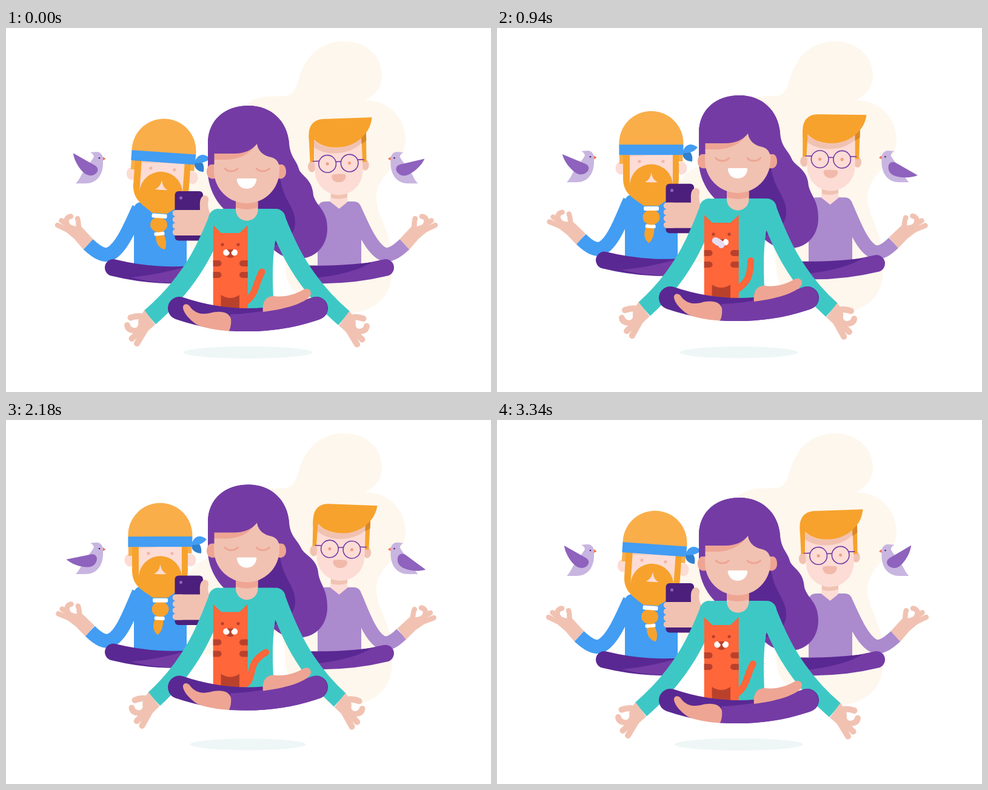
An HTML page for the animation above (3.36 s loop, 800 by 600 pixels).

```html
<!DOCTYPE html>
<html lang="en">
<head>
<meta charset="utf-8">
<title>Floating meditation</title>
<style>
html, body { margin: 0; width: 100%; height: 100%; overflow: hidden; background: #fff; }
svg { display: block; width: 800px; height: 600px; }
.skin { fill: #f1c2b2; }
.rose { fill: #eea594; }
.pale { fill: #fcdcd5; }
.plum { fill: #743ba5; }
.deep { fill: #5a2893; }
.gold { fill: #f7a22d; }
.blue { fill: #429df3; }
.teal { fill: #3ec8c5; }
.lilac { fill: #ab8ace; }
.cat { fill: #ff663a; }
.rust { fill: #b9412c; }
.white { fill: #fff; }
.line { fill: none; stroke-linecap: round; stroke-linejoin: round; }
.sleeve { fill: none; }
.finger { fill: none; stroke: #f1c2b2; stroke-linecap: round; }
</style>
</head>
<body>
<svg viewBox="0 0 800 600">
<defs>
  <g id="bird">
    <path fill="#c8b5e0" d="M139 206C143 205 147 205 151 205C157 206 160 211 160 217V226C159 244 149 257 131 257H115C120 252 122 247 126 240C133 229 140 222 145 213C144 209 142 207 139 206Z"/>
    <path fill="#f0704a" d="M160 213L164.500 216.500L160 219Z"/>
    <circle cx="154" cy="215" r="1.300" fill="#4b1f7b"/>
  </g>
  <path id="wing" fill="#8e62bd" d="M-40 -3L1 -10.500C8 -11.500 12 -6 10 0C8 7 2 10.500 -5 10.500C-18 10 -31 5 -40 -3Z"/>
  <g id="smallHand">
    <path class="skin" d="M127.500 365L143.500 348L125 328L110 326L99 336L113 348Z"/>
    <g class="finger" stroke-width="8.500">
      <path d="M110 337L85 325"/>
      <path d="M108 329L91.500 317.500"/>
      <path d="M100 321C98 315 102 311 107 310.500"/>
      <path d="M120 336C120 328 120 321 118 314"/>
    </g>
    <circle class="white" cx="110" cy="320" r="5.300"/>
  </g>
  <g id="bigHand">
    <path class="skin" d="M228.500 465L246 489L230 503L216 499L219 478Z"/>
    <g class="finger" stroke-width="10">
      <path d="M230 478C222 473 213 475 205.500 477.500"/>
      <path d="M200 490C201 498 209 500 220 496"/>
      <path d="M224 496L207.500 512"/>
      <path d="M234 490L216 520"/>
    </g>
    <circle class="white" cx="212" cy="488" r="6.300"/>
  </g>
</defs>

<path fill="#fef7ed" d="M557 22C594 22 620 46 620 78C620 98 608 113 591 119C632 119 659 148 659 185C659 222 611 242 611 278C611 312 637 335 637 385C640 432 622 461 573 470C520 470 478 446 466 420C456 398 465 368 450 352C400 380 330 392 312 384C296 350 296 300 299 275C297 250 312 234 335 228C390 215 360 150 402 122C422 108 448 115 466 111C482 104 480 82 492 62C504 37 528 22 557 22Z"/>
<ellipse id="shadow" cx="399" cy="534.700" fill="#eef6f6"/>

<g id="birdL"><use href="#bird"/><use id="wingL" href="#wing"/></g>
<g id="birdR"><use href="#bird"/><use id="wingR" href="#wing"/></g>

<g id="manR">
  <path class="lilac" d="M514 394V300C514 290 519 286 527 286H573C582 286 586 292 586 300V394Z"/>
  <path class="pale" d="M536 268H563V287L549.500 298L535 286.500Z"/>
  <path class="skin" d="M536 268H563V279Q550 284 536 280Z"/>
  <path id="sleeveR" class="sleeve" stroke="#ab8ace" stroke-width="23"/>
  <use id="handR" href="#smallHand"/>
  <path class="line" stroke="#743ba5" stroke-width="28" d="M626 395Q564 410 499 406.500"/>
  <path class="deep" d="M488 391C530 393 570 390 604 386C575 403 540 409 494 414Z"/>
</g>
<g id="headR">
  <ellipse class="skin" cx="506" cy="222" rx="6.500" ry="9"/>
  <ellipse class="skin" cx="594" cy="222" rx="6.500" ry="9"/>
  <path class="pale" d="M511 165V230A39.500 40 0 0 0 590 230V165Z"/>
  <path class="skin" d="M511 178C528 196 565 197 590 175V185C570 205 531 206 511 190Z"/>
  <path class="gold" d="M503 170H511.500L510 214H503.500ZM589.500 165H597.500L596.500 217H590Z"/>
  <path fill="#d98724" d="M589.500 176L597.500 167V182L589.500 187Z"/>
  <path class="gold" d="M503 182V170C503 154 512 144 528 144H608C606 158 601 166 594 173C582 186 566 191.500 550 191.500C534 191.500 520 187 511 177Z"/>
  <g id="eyesR" fill="#f0a184"><circle cx="532" cy="218" r="2.600"/><circle cx="568.500" cy="218" r="2.600"/></g>
  <g class="line" stroke="#743ba5" stroke-width="1.600">
    <path d="M508.500 213H518M546 215H554M582.500 213H592"/>
    <circle cx="532" cy="218" r="14.300"/><circle cx="568.500" cy="218" r="14.300"/>
  </g>
  <path fill="#f1b9aa" d="M540 236Q550 234.500 560 236C564 238 561 249 550 249C539 249 536 238 540 236Z"/>
</g>

<g id="manL">
  <path class="blue" d="M211 394V300C211 291 216 287 224 287H298V394Z"/>
  <path id="sleeveL" class="sleeve" stroke="#429df3" stroke-width="23"/>
  <use id="handL" href="#smallHand"/>
  <path class="line" stroke="#5a2893" stroke-width="28" d="M177 395Q238 410 298 406.500"/>
  <path class="plum" d="M206 411C245 407 275 400 306 391V420C270 422 238 419 206 411Z"/>
</g>
<g id="headL">
  <ellipse class="pale" cx="204" cy="231" rx="8.500" ry="10.500"/>
  <ellipse class="pale" cx="305" cy="231" rx="8.500" ry="10.500"/>
  <path fill="#f9ae4a" d="M202 207H209V224H202ZM299 207H306.500V220H299Z"/>
  <rect class="pale" x="215" y="205" width="78" height="57"/>
  <path fill="#f8cdbf" d="M219 208H262Q240 212 219 212Z"/>
  <circle cx="235" cy="220" r="2.600" fill="#f4b6a5"/>
  <circle cx="274" cy="220" r="2.600" fill="#f4b6a5"/>
  <path class="gold" d="M208 207V248C208 274 226 281 242 293H267C283 281 300 274 300 248V207H290V260A35.500 35.500 0 0 0 219 260V207Z"/>
  <path class="pale" d="M254.500 238C253 247 250 251 244 254Q254 255 265 254C259 251 256 247 254.500 238Z"/>
  <path fill="#f9ae4a" d="M201.500 194V190A53 53 0 0 1 307.500 190V194Z"/>
  <path fill="#2f80cf" d="M307 203C316 199 324 206 322 220C312 220 304 214 307 203Z"/>
  <path class="blue" d="M306 206C309 193 319 187 331 197C325 205 315 207 306 206Z"/>
  <rect class="blue" x="201.500" y="192.300" width="106" height="17"/>
  <g id="braid">
    <path id="tip" class="gold" d="M247 328C242 338 243 348 251 354.500C257 350 261 340 260 328Z"/>
    <rect class="white" x="245.500" y="324" width="17" height="6" rx="2"/>
  </g>
  <ellipse class="gold" cx="254.500" cy="312" rx="14" ry="12.500"/>
  <rect class="white" x="242" y="294" width="25" height="7" rx="2"/>
</g>
<g id="phone">
  <rect x="278.500" y="269" width="46.500" height="81.500" rx="6" fill="#4b1f7b"/>
  <circle cx="288.500" cy="280" r="2.600" fill="#8e62bd"/>
  <path class="skin" d="M279 300H320C320 292 319 285 322 280C326 273 335 276 334 284C332 293 334 300 338 308V342H279Z"/>
  <path class="finger" stroke-width="10.500" d="M280 305.300H290M280 315.800H290M280 326.300H290M280 336.800H290"/>
</g>

<g id="woman">
  <path id="hair" class="plum"/>
  <path class="deep" d="M400 280L440 360C463 350 477 342 477 320C477 292 453 282 451 235Z"/>
  <path class="teal" d="M342 462V330C342 305 348 298 360 298H437C452 298 460 308 463 322L444 352C438 388 440 428 442 464Z"/>
  <path id="armL" class="sleeve" stroke="#3ec8c5" stroke-width="29.500"/>
  <path id="armR" class="sleeve" stroke="#3ec8c5" stroke-width="29.500"/>
  <circle class="teal" cx="350" cy="314" r="16"/>
  <circle class="teal" cx="445" cy="314" r="16"/>
  <use id="palmL" href="#bigHand"/>
  <use id="palmR" href="#bigHand"/>
  <path class="skin" d="M379 275H415.500V299.500A18.250 18.250 0 0 1 379 299.500Z"/>
  <path class="rose" d="M379 280H415.500V296Q397 302 379 296Z"/>
  <path class="rose" d="M344 225C336 223 331 229 331 237C331 245 336 250 345 248ZM450 225C458 223 462 229 462 237C462 245 457 250 449 248Z"/>
  <path class="skin" d="M343 190V235A54 54 0 0 0 451 235V190Z"/>
  <path class="rose" d="M343 205V217H363C390 216 404 205 414 190Z"/>
  <path class="plum" d="M333 225V190C333 150 363 128 400 128C437 128 464 153 467 190L456 225H450C448 218 444 215 437 213C427 211 416 205 414 191C405 202 392 207 377 207H343.500V225Z"/>
  <path class="line" stroke="#eea594" stroke-width="3" d="M361 231.500C366 237.500 377 237.500 382.500 231.500M413 231.500C418 237.500 429 237.500 434.500 231.500"/>
  <path class="white" d="M382.500 248H411.500Q413.500 248 413.300 250C412 260 405 265 397 265C389 265 382 260 380.700 250Q380.500 248 382.500 248Z"/>

  <path id="tail" class="line" stroke="#ff663a" stroke-width="11"/>
  <path class="cat" d="M341.700 325L355 338H385L398.700 325V462H341.700Z"/>
  <circle class="rust" cx="357" cy="357" r="2.600"/>
  <circle class="rust" cx="383" cy="357" r="2.600"/>
  <path class="rust" d="M370 369L376 377Q370 381 364 377Z"/>
  <circle class="white" cx="363.500" cy="370" r="5.300"/>
  <circle class="white" cx="376.800" cy="370" r="5.300"/>
  <path class="rust" d="M364.500 365H375.500L370 371.500Z"/>
  <path id="tongue" class="line" stroke="#e6dcf3"/>
  <path class="rust" d="M341.700 383H350.500A5 5 0 0 1 350.500 393H341.700ZM341.700 402H350.500A5 5 0 0 1 350.500 412H341.700ZM398.700 383H390A5 5 0 0 0 390 393H398.700ZM398.700 402H390A5 5 0 0 0 390 412H398.700Z"/>
  <path class="rust" d="M354.500 462V440Q370 450 385 440V462Z"/>

  <path class="line" stroke="#5a2893" stroke-width="38" d="M286 462Q399 500 512 462"/>
  <path class="plum" d="M367 499.500C371 490 371 480 370 472C420 470 465 460 506 444A19 19 0 0 1 518 480C470 497 425 502 367 499.500Z"/>
  <path class="rose" d="M292 462C291 454 300 453 304 460C312 470 322 473 336 470C353 465 368 468 371 479C372 488 370 495 368 499.500C345 498 325 494 315 489C303 481 294 471 292 462Z"/>
  <path class="rose" d="M424 468C422 450 430 441 443 442C460 444 475 440 491 431C498 427 505 433 502.500 440C497 451 470 462 424 468Z"/>
</g>
</svg>
<script>
const LOOP = 3360;
const $ = id => document.getElementById(id);
const set = (id, name, value) => $(id).setAttribute(name, value);
const move = (id, value) => set(id, 'transform', value);
const smooth = x => x * x * (3 - 2 * x);
const clamp = x => Math.max(0, Math.min(1, x));

// 0 at rest, 1 at the top of the float
const lift = (t, peak, end) =>
  smooth(t < peak ? t / peak : clamp((end - t) / (end - peak)));

// 0 with the wing raised, 1 in the middle of a beat
const flap = (t, beats) =>
  Math.max(...beats.map(b => smooth(clamp(1 - Math.abs(t - b) / 300))));

// sleeve of a man, from wrist over elbow to shoulder
function bentSleeve(id, flip, wx, wy, ex, ey) {
  const X = x => flip ? 793 - x : x;
  set(id, 'd', `M${X(135.5 + wx)} ${356.5 + wy}C${X(150 + (wx + ex) / 2)} ${370 + (wy + ey) / 2} ` +
    `${X(162 + ex)} ${377 + ey} ${X(172 + ex)} ${372 + ey}C${X(192 + ex)} ${362 + ey} ${X(208)} 320 ${X(219)} 297`);
}

function drawHair(k) {
  const sway = 11 * k;
  set('hair', 'd', 'M333 240V190C333 150 363 128 400 128C437 128 464 153 467 190' +
    `C469 214 479 216 ${484 + sway / 2} 235C${491 + sway / 2} 246 ${505 + sway} 250 ${507 + sway} 276` +
    `C${512 + sway * 0.8} 294 530 300 530 330` +
    'C530 362 508 380 484 380C468 381 452 377 438 362L360 299C345 285 334 262 333 240Z');
}

function drawTail(t) {
  const s = 0.5 - 0.5 * Math.cos(2 * Math.PI * (t - 700) / LOOP);
  set('tail', 'd', `M${395 + 3 * s} ${448 + 7 * s}C${415 - 5 * s} ${436 + 4 * s} ` +
    `${419 - 22 * s} ${424 - 2 * s} ${418 + 11 * s} ${400.5 + 4 * s}`);
}

// the cat licks to one side, then to the other
function drawTongue(t) {
  const p = clamp((t - 480) / 640);
  const s = Math.sin(2 * Math.PI * p);
  set('tongue', 'd', `M370 374.500Q${370 + 3 * s} 370 ${370 + 10 * s} 367.500`);
  set('tongue', 'stroke-width', 11 * Math.min(1, 8 * p, 8 * (1 - p)));
}

function drawWoman(t) {
  const k = lift(t, 1640, LOOP);
  move('woman', `translate(0 ${-28 * k})`);
  set('shadow', 'rx', 106 - 14 * k);
  set('shadow', 'ry', 10 - 0.7 * k);
  const arm = (X, dy) => `M${X(350)} 312C${X(335)} 350 ` +
    `${X(310 + 5 * k)} ${415 + 4 * k + dy} ${X(237.3 + 9 * k)} ${477 + 6 * k + dy}`;
  set('armL', 'd', arm(x => x, 0));
  set('armR', 'd', arm(x => 795 - x, 1.5));
  const hand = `translate(${9 * k} ${6 * k}) rotate(${-2.8 * k} 237 477)`;
  move('palmL', hand);
  move('palmR', `translate(795 1.5) scale(-1 1) ${hand}`);
  drawHair(k);
  drawTail(t);
  drawTongue(t);
}

function drawLeft(t) {
  const k = lift(t, 1520, 3280), y = -18.3 * k;
  move('manL', `translate(0 ${y})`);
  move('phone', `translate(0 ${y})`);
  move('headL', `translate(0 ${12.3 + y}) rotate(${4 - 6 * k} 254 276)`);
  const swing = k - 0.672;
  move('braid', `rotate(${3 + 19 * swing} 254 312)`);
  move('tip', `rotate(${24 * swing - 3} 254 327)`);
  bentSleeve('sleeveL', false, 4.5 * k, 5.8 * k, 2 * k, 4.5 * k);
  move('handL', `translate(${4.5 * k} ${5.8 * k}) rotate(${-4.6 * k} 135 357)`);
}

function drawRight(t) {
  const k = lift(t, 1760, LOOP), y = -12.4 * k;
  move('manR', `translate(0 ${y})`);
  move('headR', `translate(0 ${5.3 + y}) rotate(${-2 + 4.9 * k} 549 271)`);
  const open = clamp(Math.abs(t - 660) / 40 - 0.8);
  move('eyesR', `translate(0 218) scale(1 ${open}) translate(0 -218)`);
  bentSleeve('sleeveR', true, 6 * k, 8 * k, 2 * k, 5.5 * k);
  move('handR', `translate(793 0) scale(-1 1) translate(${6 * k} ${8 * k}) rotate(${-6.2 * k} 135 357)`);
}

function drawBirds(t) {
  const a = flap(t, [300, 720, 1560, 2180, 2920]);
  const b = flap(t, [200, 640, 1000, 1700, 2180, 2920]);
  move('birdL', `translate(0 ${-3 * b})`);
  move('birdR', `translate(794.500 ${-3 * b}) scale(-1 1)`);
  move('wingL', `translate(139.500 235) rotate(${40 - 41 * a})`);
  move('wingR', `translate(139.500 235) rotate(${41 - 67 * b})`);
}

function draw(t) {
  drawBirds(t);
  drawRight(t);
  drawLeft(t);
  drawWoman(t);
}

const start = performance.now();
function frame() {
  draw((performance.now() - start) % LOOP);
  requestAnimationFrame(frame);
}
draw(0);
requestAnimationFrame(frame);
</script>
</body>
</html>
```
